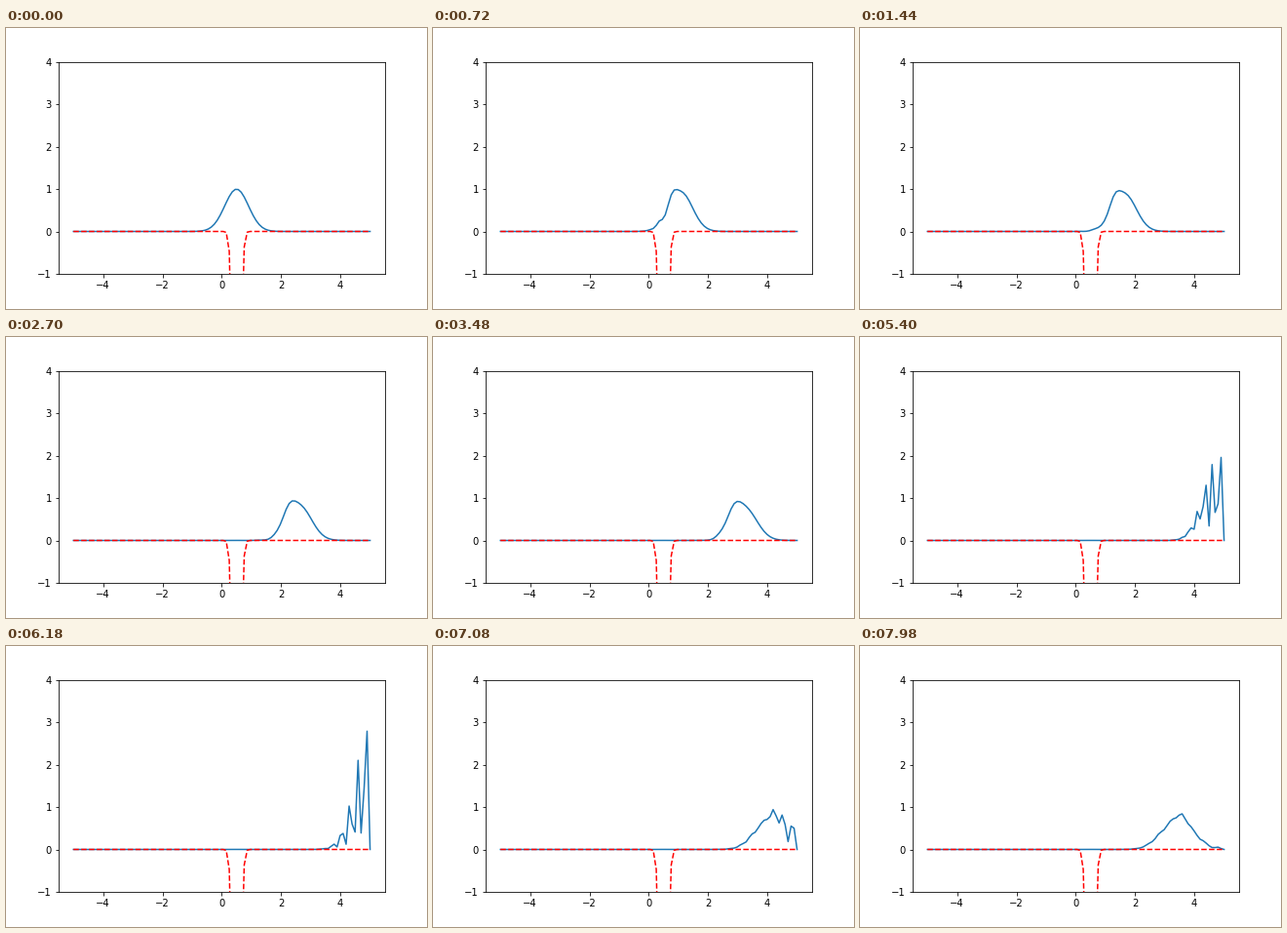
A matplotlib script for the animation above (8 s loop, 432 by 288 pixels).

```python
import numpy as np
import matplotlib.pyplot as plt
from matplotlib.animation import FuncAnimation

# Gaussian wave packet leaving a narrow well, hard walls at both ends (hbar = m = 1)
N = 100
DT = 0.005
K0 = 12.0
X0, SIGMA = 0.5, 0.4
DEPTH, WELL = 10.0, 0.1

x = np.linspace(-5, 5, N)
dx = x[1] - x[0]
potential = -DEPTH * np.exp(-(x - X0) ** 2 / (2 * WELL ** 2))

psi0 = np.exp(-(x - X0) ** 2 / (4 * SIGMA ** 2) + 1j * K0 * x)
psi0 /= (2 * np.pi * SIGMA ** 2) ** 0.25

hop = np.full(N - 3, -0.5 / dx ** 2)
H = np.diag(1 / dx ** 2 + potential[1:-1]) + np.diag(hop, 1) + np.diag(hop, -1)
energy, modes = np.linalg.eigh(H)
coeffs = modes.T @ psi0[1:-1]


def density(step):
    psi = modes @ (coeffs * np.exp(-1j * energy * step * DT))
    return np.pad(np.abs(psi) ** 2, 1)


TICK_MS, LOOP_MS, STEP_MS = 20, 8000, 60

fig, ax = plt.subplots(figsize=(6, 4), dpi=72, facecolor="white")
fig.subplots_adjust(left=0.125, right=0.9, bottom=0.125, top=0.88)
wave, = ax.plot(x, density(0), color="C0", lw=1.5)
ax.plot(x, potential, "r--", lw=1.5)
ax.set_xlim(-5.5, 5.5)
ax.set_ylim(-1, 4)
ax.set_xticks(range(-4, 5, 2))
ax.set_yticks(range(-1, 5))


def update(i):
    wave.set_ydata(density(i * TICK_MS // STEP_MS))
    return wave,


anim = FuncAnimation(fig, update, frames=LOOP_MS // TICK_MS,
                     interval=TICK_MS, repeat=True, repeat_delay=0)
plt.show()
```
